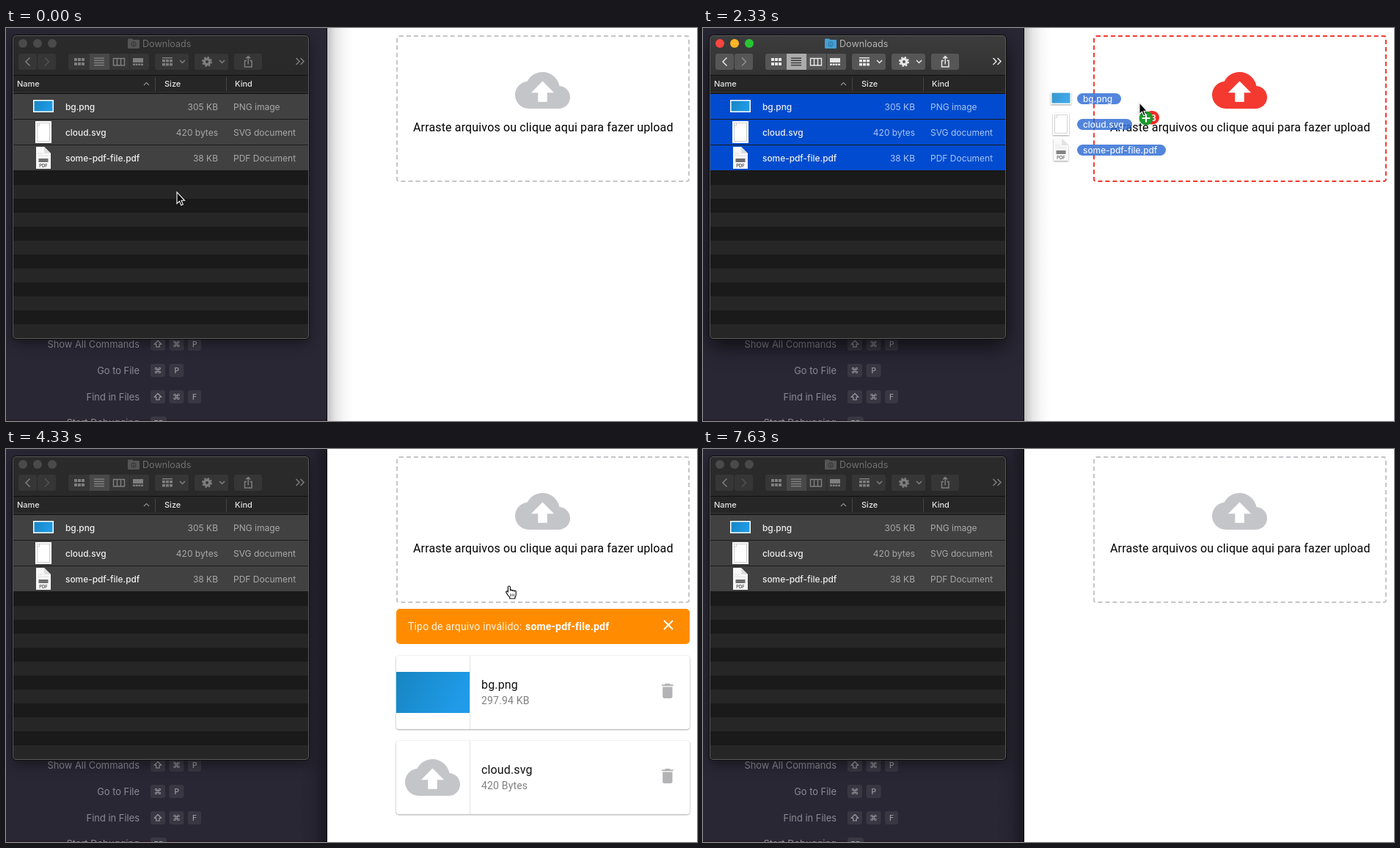
An HTML page that plays this animation: 942x536 px, repeating every 8010 ms.

```html
<!DOCTYPE html>
<html lang="pt">
<head>
<meta charset="utf-8">
<title>Upload</title>
<style>
html, body { margin: 0; width: 100%; height: 100%; overflow: hidden; background: #fff; }
#stage { position: absolute; left: 0; top: 0; width: 942px; height: 536px; overflow: hidden; --zone: #c4c5c9; }
#stage.over { --zone: #f43930; }
#zone { position: absolute; left: 532px; top: 10px; width: 400px; height: 200px; box-sizing: border-box;
  border: 2px dashed var(--zone); border-radius: 4px; }
svg { position: absolute; left: 0; top: 0; }
text { white-space: pre; }
.mac { font-family: Inter, "Liberation Sans", sans-serif; font-size: 12px; }
.web { font-family: Roboto, Arial, sans-serif; font-size: 16px; letter-spacing: .00938em; }
.web .small { font-size: 14px; letter-spacing: .0125em; }
.label { font-size: 12.9px; text-anchor: end; fill: #8b8a92; }
.name { font-size: 11.9px; font-weight: 500; }
.key { font-family: "DejaVu Sans", sans-serif; font-size: 11px; text-anchor: middle; fill: #a3a2a9; }
.end { text-anchor: end; }
.mid { text-anchor: middle; }
.line { fill: none; stroke: var(--icon); stroke-width: 1.5; }
#finder { --bar1: #2b2b2b; --bar2: #292929; --btn: #363636; --sel: #484848; --icon: #7e7e7e; --selIcon: #868686;
  --title: #707070; --row: #414141; --info: #a9a9a9; --folder: #555; --mark: #333; --r: #4a4a4a; --y: #4a4a4a; --g: #4a4a4a;
  --shade: drop-shadow(0 6px 9px rgba(0,0,0,.42)); }
#finder.on { --bar1: #3d3c3d; --bar2: #333233; --btn: #575657; --sel: #acabac; --icon: #e6e6e6; --selIcon: #333;
  --title: #b5b4b5; --row: #004bcf; --info: #a9c6f5; --folder: #459fd2; --mark: #2875a6; --r: #fc4540; --y: #fdb425; --g: #29c433;
  --shade: drop-shadow(0 10px 14px rgba(0,0,0,.65)); }
.card { filter: drop-shadow(0 1px 1px rgba(0,0,0,.3)) drop-shadow(0 0 1px rgba(0,0,0,.1)); }
</style>
</head>
<body>
<div id="stage"><div id="zone"></div></div>
<script>
const LOOP = 8010;
const $ = id => document.getElementById(id);
const rect = (x, y, w, h, fill, rx = 0) => `<rect x="${x}" y="${y}" width="${w}" height="${h}" fill="${fill}" rx="${rx}"/>`;
const disc = (x, y, r, fill) => `<circle cx="${x}" cy="${y}" r="${r}" fill="${fill}"/>`;
const text = (x, y, s, fill, more = '') => `<text x="${x}" y="${y}" fill="${fill}" ${more}>${s}</text>`;
const line = (d, more = '') => `<path class="line" d="${d}" ${more}/>`;
const range = (n, f) => Array.from({ length: n }, (_, i) => f(i)).join('');
const grad = (id, stops, more = '') => `<linearGradient id="${id}" ${more}>` +
  stops.map(([o, c, a = 1]) => `<stop offset="${o}" style="stop-color:${c};stop-opacity:${a}"/>`).join('') + '</linearGradient>';

const CLOUD = 'M19.35 10.04C18.67 6.59 15.64 4 12 4 9.11 4 6.6 5.64 5.35 8.04 2.34 8.36 0 10.91 0 14c0 3.31 2.69 6 6 6h13c2.76 0 5-2.24 5-5 0-2.64-2.05-4.78-4.65-4.96zM14 13v4h-4v-4H7l5-5 5 5h-3z';
const cloud = (x, y, fill) => `<path d="${CLOUD}" fill="${fill}" transform="translate(${x} ${y}) scale(3.125)"/>`;

// name, size, kind, width of the label while dragged
const FILES = [
  ['bg.png', '305 KB', 'PNG image', 60],
  ['cloud.svg', '420 bytes', 'SVG document', 75],
  ['some-pdf-file.pdf', '38 KB', 'PDF Document', 121]
];

const ICONS =
  rect(37, 98, 28, 17, '#fff') + rect(38.5, 99.5, 25, 14, 'url(#blue)') +
  rect(40, 127, 22, 30, '#fff') +
  '<path d="M42.5 129.5h17v25h-17zM42.5 133h3v-3.5" fill="none" stroke="#c2c2c2" stroke-width=".8"/>' +
  '<path d="M41 162h11l9 9v21h-20z" fill="#f8f8f8"/><path d="M52 162v9h9z" fill="#dedede"/>' +
  '<path d="M43 171h7M43 174h15" stroke="#e2e2e2"/>' +
  rect(44.5, 178, 13, 5, '#6f6f72') + text(51, 189.5, 'PDF', '#333', 'class="mid" font-size="5.8" font-weight="500"');

function editor() {
  const rows = [['Show All Commands', '⇧⌘P'], ['Go to File', '⌘P'], ['Find in Files', '⇧⌘F']];
  const label = (y, s) => `<text class="label" x="182" y="${y}">${s}</text>`;
  const shift = (x, y) => `<path d="M${x} ${y - 4.5}l4.7 4.7h-2.5v3.800h-4.400v-3.800h-2.500z" fill="none" stroke="#a3a2a9" stroke-width="1.1"/>`;
  const key = (x, y, w, s) => rect(x, y - 9, w, 18, '#393842', 3) +
    (s == '⇧' ? shift(x + w / 2, y) : text(x + w / 2, y + 4, s, '#a3a2a9', 'class="key"'));
  return rect(0, 0, 438, 536, '#292734') + rect(0, 534.5, 437, 1.5, '#2a1a27') +
    rows.map(([name, keys], i) => {
      const y = 431 + 36 * i;
      return label(y + 4.5, name) +
        [...keys].map((k, j) => key(197 + 25.5 * j, y, j == 2 ? 18 : 20, k)).join('');
    }).join('') +
    label(543, 'Start Debugging') + key(197, 539, 22, 'F5') +
    '<g id="pageShade">' + rect(400, 0, 38, 536, 'url(#shadeL)') + '</g>';
}

function toolbar() {
  const cells = (x, y, w, h, dx, dy) => range(6, i => rect(x + i % 3 * dx, y + (i > 2 ? dy : 0), w, h, 'var(--icon)'));
  const down = x => line(`M${x} 44l3.5 3.5 3.5-3.5`);
  return [[17, 25], [43, 25], [85, 110], [203, 46], [257, 46], [311, 38]].map(([x, w]) => rect(x, 35, w, 22, 'var(--btn)', 3)).join('') +
    rect(114, 35, 27, 22, 'var(--sel)') + rect(168, 35, .8, 22, '#2d2d2d') +
    line('M32.5 40.5l-5.5 5.5 5.5 5.5') + line('M53 40.5l5.5 5.5-5.5 5.5', 'opacity=".4"') +
    cells(93, 41, 4, 4, 5, 6) +
    range(4, i => rect(120, 40.5 + 3.2 * i, 14, 1.3, 'var(--selIcon)')) +
    line('M146.5 41.5h15v9.5h-15zM151.5 41v10M156.5 41v10', 'stroke-width="1.2"') +
    rect(173, 41, 14, 6, 'var(--icon)') + range(4, i => rect(173 + 3.7 * i, 48.5, 2.9, 2.5, 'var(--icon)')) +
    rect(213, 40, 14, 1.5, 'var(--icon)') + cells(213, 43, 4, 3.5, 5, 5) + down(237) +
    '<circle cx="274" cy="46" r="3.7" fill="none" stroke="var(--icon)" stroke-width="3.4"/>' +
    '<circle cx="274" cy="46" r="6" fill="none" stroke="var(--icon)" stroke-width="2" stroke-dasharray="2.356 2.356"/>' + down(291) +
    line('M328 44.5h-2.5v8.5h9.5v-8.5h-2.5M330.2 49.5v-10.5M327.2 41.5l3-3 3 3', 'stroke-width="1.2"') +
    line('M395.5 41l4.5 4.5-4.5 4.5M401.5 41l4.5 4.5-4.5 4.5');
}

function finder() {
  const head = (x, s) => text(x, 80, s, '#e4e4e4', 'font-size="11" font-weight="500"');
  return '<g id="finder">' + grad('bar', [[0, 'var(--bar1)'], [1, 'var(--bar2)']], 'x2="0" y2="1"') +
    '<rect x="9" y="10" width="404" height="414" rx="5" fill="#1a1a1a" style="filter:var(--shade)"/>' +
    '<g clip-path="url(#frame)">' +
    rect(9, 10, 404, 55, 'url(#bar)') + rect(9, 64, 404, 1, '#111') +
    rect(9, 65, 404, 24, '#262626') + rect(9, 87.5, 404, 1, '#434343') + rect(9, 88.5, 404, 1, '#151515') +
    rect(203, 67, 1, 19, '#444') + rect(300, 67, 1, 19, '#444') +
    range(12, i => rect(9, 195 + 19 * i, 404, 19.5, i % 2 ? '#262626' : '#1a1a1a')) +
    range(3, i => rect(9, 90 + 35 * i, 404, 34, 'var(--row)')) +
    '</g>' +
    ['r', 'y', 'g'].map((c, i) => disc(23 + 20 * i, 21, 6, `var(--${c})`)).join('') +
    '<path d="M166 15.5q0-1 1-1h5l1.5 1.5h7.5q1 0 1 1v10q0 1-1 1h-14q-1 0-1-1z" fill="var(--folder)"/>' +
    '<circle cx="174" cy="22" r="3.2" fill="none" stroke="var(--mark)"/>' +
    '<path d="M174 20v3.5M172.7 22.3l1.3 1.3 1.3-1.3" fill="none" stroke="var(--mark)" stroke-width=".8"/>' +
    text(186, 25.5, 'Downloads', 'var(--title)', 'font-size="12.6"') +
    toolbar() + head(15, 'Name') + head(216, 'Size') + head(312, 'Kind') +
    '<path d="M188 78l3.5-3.5 3.5 3.5" fill="none" stroke="#909090" stroke-width="1.2"/>' +
    ICONS +
    FILES.map(([name, size, kind], i) => {
      const y = 112 + 35 * i;
      return text(81, y, name, '#f0f0f0', 'class="name"') +
        text(289, y, size, 'var(--info)', 'class="end"') + text(310, y, kind, 'var(--info)');
    }).join('') +
    '<rect x="8.5" y="9.5" width="405" height="415" rx="5.5" fill="none" stroke="#0d0d10"/>' +
    '<rect x="9.5" y="10.5" width="403" height="413" rx="4.5" fill="none" stroke="#5a5a5a"/></g>';
}

function card(id, name, size, thumb) {
  return `<g id="${id}"><g class="card">${rect(532, 0, 400, 100, '#fff', 4)}</g>` + thumb +
    rect(632, 0, 1, 100, '#e2e2e2') + text(648, 45, name, '#111') + text(648, 66, size, '#808080', 'class="small"') +
    '<path d="M6 19c0 1.1.9 2 2 2h8c1.1 0 2-.9 2-2V7H6v12zM19 4h-3.5l-1-1h-5l-1 1H5v2h14V4z" fill="#b3b3b5" transform="translate(888.5 34.7) scale(1.11)"/></g>';
}

function page() {
  return '<g class="web">' + cloud(694, 47.5, 'var(--zone)') +
    text(555, 141, 'Arraste arquivos ou clique aqui para fazer upload', '#000') +
    '<g id="alert">' + rect(532, 218, 400, 48, '#ff8c00', 5) +
    text(548, 247, 'Tipo de arquivo inválido:', '#fff3e0', 'class="small"') +
    text(708, 247, 'some-pdf-file.pdf', '#fff', 'class="small" font-weight="700"') +
    '<path d="M897 234l12 12M909 234l-12 12" stroke="#fff" stroke-width="2"/></g>' +
    card('bg', 'bg.png', '297.94 KB', rect(532, 22, 100, 56, 'url(#blue)')) +
    card('svgFile', 'cloud.svg', '420 Bytes', cloud(544, 12.5, '#c4c5c9')) + '</g>' +
    '<g id="editorShade">' + rect(438, 0, 36, 536, 'url(#shadeR)') + '</g>' + rect(437, 0, 1, 536, '#0c0b10');
}

function pointer() {
  return '<g id="ghost" class="mac"><g opacity=".85" style="filter:drop-shadow(0 1px 1px rgba(0,0,0,.45))">' + ICONS + '</g>' +
    FILES.map(([name, , , w], i) => rect(73, 100 + 35 * i, w, 15, 'rgba(44,107,211,.82)', 7.5) +
      text(81, 112 + 35 * i, name, '#eef4ff', 'class="name"')).join('') + '</g>' +
    '<g id="cursor"><g id="badge" class="mac">' + rect(7, 11, 20, 18.5, '#ee2b24', 9.2) +
    text(19, 25, '3', '#fff', 'class="mid" font-weight="600"') + disc(9, 21, 9.5, '#1d9a2c') +
    '<path d="M9 15.5v11M3.5 21h11" stroke="#fff" stroke-width="2.2"/></g>' +
    '<path id="arrow" d="M0 0V15.5L3.5 12.2L5.8 17.8L8.3 16.8L6 11.3H10.5Z" fill="#050505" stroke="#fff" stroke-width="1.1" style="filter:drop-shadow(0 1px 1px rgba(0,0,0,.35))"/>' +
    '<g id="hand" stroke="#111" stroke-width="1.2" stroke-linejoin="round"><path fill="#fff" d="M-1.6 1.5a1.5 1.5 0 0 1 3 0V6a1.4 1.4 0 0 1 2.7.4 1.4 1.4 0 0 1 2.6.7 1.3 1.3 0 0 1 2.5.9V11.5q0 2-1.3 3.7V17H.8v-1.8q-2.5-2-4-5.2-1.8-2.2-.6-3 1-.7 2.2 1z"/>' +
    '<path fill="none" stroke-width=".8" d="M1.7 10.5v3.5M4 10.5v3.5M6.3 10.5v3.5"/></g></g>';
}

$('stage').insertAdjacentHTML('beforeend', '<svg width="942" height="536" viewBox="0 0 942 536"><defs>' +
  grad('blue', [[0, '#1685c2'], [1, '#209be8']], 'y2=".3"') +
  grad('shadeL', [[0, '#000', 0], [.5, '#000', .1], [1, '#000', .38]]) +
  grad('shadeR', [[0, '#000', .24], [.3, '#000', .1], [.65, '#000', .03], [1, '#000', 0]]) +
  '<clipPath id="frame"><rect x="9" y="10" width="404" height="414" rx="5"/></clipPath>' +
  '<clipPath id="left"><rect width="438" height="536"/></clipPath></defs>' +
  '<g class="mac" clip-path="url(#left)">' + editor() + finder() + '</g>' + page() + pointer() + '</svg>');

// time, x, y of the pointer tip
const PATH = [
  [0, 233, 224], [30, 233, 224], [200, 229, 218], [770, 229, 218], [1450, 158, 112], [1670, 158, 112],
  [1770, 208, 112], [2330, 595, 102], [2700, 690, 101], [3000, 710, 101], [3970, 710, 101],
  [4330, 686, 187], [4870, 903, 238], [5080, 903, 238], [5430, 904, 244], [6000, 900, 268], [6350, 900, 270],
  [6870, 900, 270], [7200, 901, 272], [LOOP, 901, 272]
];

function slope(i, k) {
  const a = PATH[i - 1], b = PATH[i], c = PATH[i + 1];
  if (!a || !c) return 0;
  const p = (b[k] - a[k]) / (b[0] - a[0]), q = (c[k] - b[k]) / (c[0] - b[0]);
  return p * q > 0 ? 2 * p * q / (p + q) : 0;
}

function along(t, k) {
  let i = 0;
  while (i < PATH.length - 2 && PATH[i + 1][0] <= t) i++;
  const a = PATH[i], b = PATH[i + 1], d = b[0] - a[0], u = (t - a[0]) / d, v = 1 - u;
  return a[k] * v * v * (1 + 2 * u) + b[k] * u * u * (1 + 2 * v) +
    d * u * v * (slope(i, k) * v - slope(i + 1, k) * u);
}

const ramp = (t, a, b) => {
  const u = Math.min(1, Math.max(0, (t - a) / (b - a)));
  return u * u * (3 - 2 * u);
};
const show = (id, on) => { $(id).style.display = on ? '' : 'none'; };
const move = (id, x, y) => $(id).setAttribute('transform', `translate(${x.toFixed(2)} ${y.toFixed(2)})`);

function draw(t) {
  const during = (a, b) => t >= a && t < b;
  const x = along(t, 1), y = along(t, 2);
  const drag = during(1800, 3030), pageFront = t >= 3030;

  $('finder').classList.toggle('on', during(1430, 3160));
  $('stage').classList.toggle('over', during(2230, 3190));
  show('pageShade', pageFront);
  show('editorShade', !pageFront);

  const closing = ramp(t, 5000, 5200), top = 226 + 56 * (1 - closing);
  const hasBg = during(3200, 6500);
  $('alert').style.opacity = ramp(t, 3190, 3290) * (1 - closing);
  show('alert', during(3190, 5200));
  show('bg', hasBg);
  show('svgFile', during(3200, 7430));
  move('bg', 0, top);
  move('svgFile', 0, top + (hasBg ? 116 : 0));

  show('ghost', drag);
  show('badge', drag && t >= 2230);
  move('ghost', x - 158, y - 113);
  move('cursor', x, y);
  const hand = during(3970, 7460);
  show('hand', hand);
  show('arrow', !hand);
  show('cursor', t < 7630);
}

let start;
function tick(now) {
  start ??= now;
  draw((now - start) % LOOP);
  requestAnimationFrame(tick);
}
draw(0);
requestAnimationFrame(tick);
</script>
</body>
</html>
```
